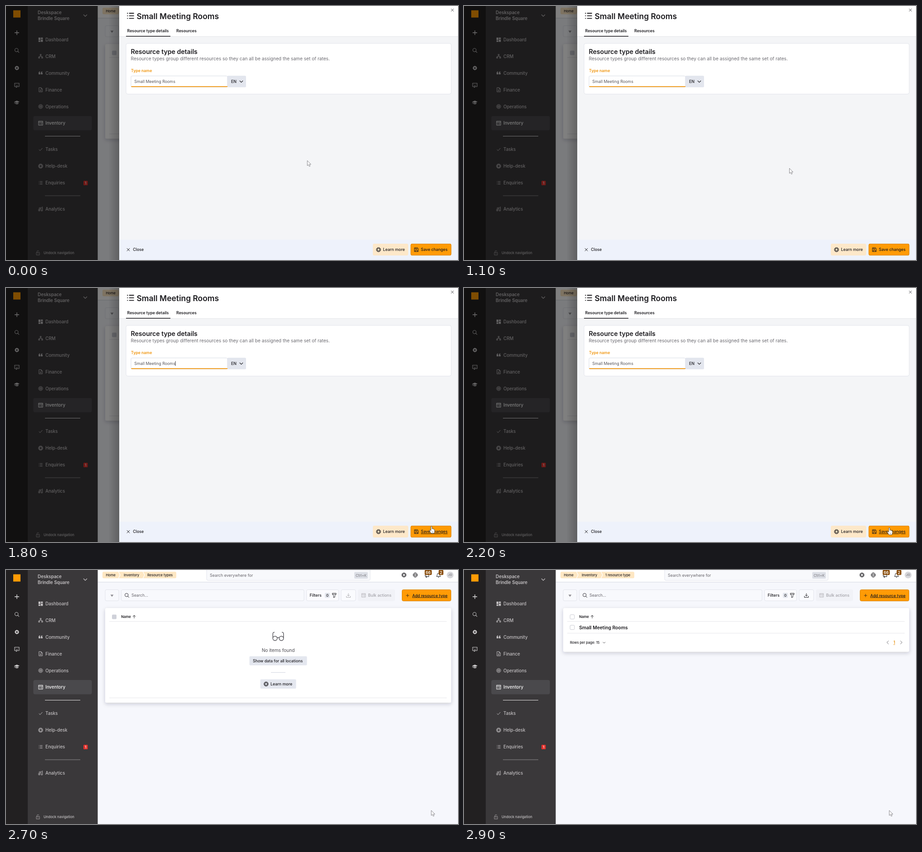
Recreate the animation shown at these times as an HTML page. Size 998 by 561 pixels, loop 3 s.

```html
<!DOCTYPE html>
<html lang="en">
<head>
<meta charset="utf-8">
<title>Add a resource type</title>
<style>
html, body { margin: 0; width: 100%; height: 100%; overflow: hidden; background: #f6f7fc; }
svg { display: block; width: 998px; height: 561px; font-family: Inter, sans-serif; font-optical-sizing: none; }
text { white-space: pre; }
</style>
</head>
<body>
<svg id="stage" viewBox="0 0 998 561" xmlns="http://www.w3.org/2000/svg"></svg>
<script>
const INK = '#1c1b1f', ORANGE = '#ff9b05', NAV = '#c4c1c3', RULE = '#e2e4eb', RIM = '#d98509';

// y is the middle of the capitals
const text = (x, y, s, size = 8.8, fill = INK, weight = 500, more = '') =>
  `<text x="${x}" y="${(y + size * .364).toFixed(2)}" font-size="${size}" font-weight="${weight}" fill="${fill}" ${more}>${s}</text>`;
const box = (x, y, w, h, fill, r = 0, stroke = 'none', more = '') =>
  `<rect x="${x}" y="${y}" width="${w}" height="${h}" rx="${r}" fill="${fill}" stroke="${stroke}" ${more}/>`;
const line = (x1, x2, y, stroke, w = 1, more = '') =>
  `<path d="M${x1} ${y}H${x2}" stroke="${stroke}" stroke-width="${w}" ${more}/>`;
const group = (id, ...parts) => `<g id="${id}">${parts.join('')}</g>`;
const UNDER = 'text-decoration="underline"';

// Outlines centred on the origin
const circle = (r, x = 0, y = 0) => `M${x - r} ${y}a${r} ${r} 0 1 0 ${2 * r} 0a${r} ${r} 0 1 0 ${-2 * r} 0z`;
const SHAPES = {
  plus: 'M-5 0H5M0-5V5',
  cross: 'M-3-3L3 3M3-3L-3 3',
  down: 'M-3.6-1.8L0 1.8L3.6-1.8',
  left: 'M2-3.8L-1.8 0L2 3.8',
  right: 'M-2-3.8L1.8 0L-2 3.8',
  up: 'M0 3.4V-3.2M-3-.3L0-3.3L3-.3',
  search: circle(3.7, -.8, -.8) + 'M1.9 1.9L5 5',
  ring: circle(4.7) + circle(2.7) + 'M-4.3-1.8L-2.3-1.3M-1.8-4.3L-1.3-2.3M4.3-1.8L2.3-1.3M1.8-4.3L1.3-2.3M-4.3 1.8L-2.3 1.3M-1.8 4.3L-1.3 2.3M4.3 1.8L2.3 1.3M1.8 4.3L1.3 2.3',
  globe: circle(4.7) + 'M-4.7 0H4.7M0-4.7C-2.8-2-2.8 2 0 4.7C2.8 2 2.8-2 0-4.7',
  gear: circle(3) + 'M0-5V-3M0 5V3M-5 0H-3M5 0H3M-3.5-3.5L-2-2M3.5-3.5L2-2M-3.5 3.5L-2 2M3.5 3.5L2 2',
  chat: 'M-5-4.5H5V3H1L-1.5 5V3H-5zM-2-1.8V-.8M2-1.8V-.8M-1.6 1Q0 1.8 1.6 1',
  people: 'M-1.2-4.5H1.2V-2.3H-1.2zM-4.6 1.8H-2.2V4H-4.6zM2.2 1.8H4.6V4H2.2zM0-2.3V0M-3.4 1.8V0H3.4V1.8',
  file: 'M-3.7-4.7H1L3.7-2V4.7H-3.7zM1-4.7V-2H3.7M-1.8.4H1.8M-1.8 2.5H1.8',
  chip: circle(4.5) + 'M-2-2H2V2H-2zM-1 0H1',
  table: 'M-4.6-4.5H4.6V4.5H-4.6zM-4.6-2.3H4.6M-2.8 0H-1.4M-2.8 2.3H-1.4M.2 0H3M.2 2.3H3',
  check: 'M-3.8.2L-1.2 2.7L3.9-2.8',
  list: 'M-4-3H-3M-4 0H-3M-4 3H-3M-1.7-3H4M-1.7 0H4M-1.7 3H4',
  chart: 'M-4.5 4.5V1H-2V4.5zM-2 4.5V-.5H1V4.5M1 4.5H4V-3M-4.2-1.2L-1-3L1-2.2L4.5-4.6',
  lock: 'M-3.5-.8H3.5V4.7H-3.5zM-2-.8V-3Q-2-4.8 0-4.8Q2-4.8 2-3M0 1V2.6',
  funnel: 'M-4.2-4.7H4.2V-2.6L1.4.6V4L-1.4 5V.6L-4.2-2.6zM-4.2-2.2H4.2',
  load: 'M0-4.5V1.5M-2.7-1L0 1.7L2.7-1M-4.5 1.6V4.4H4.5V1.6',
  disk: 'M-4.2-4.2H2.6L4.2-2.6V4.2H-4.2zM-2.2-4.2V-1.6H1.7V-4.2M-2.2 4.2V1H2.2V4.2',
  horn: 'M-4.5-1L3.5-4V3L-4.5 1.4zM-3 1.6V4.2H-.8V2',
  bell: 'M-4.4 2.8Q-3 1.5-3-1Q-3-4.4 0-4.4Q3-4.4 3-1Q3 1.5 4.4 2.8zM-1.2 4.6H1.2',
  glasses: circle(4.8, -7, 4) + circle(4.8, 7, 4) + 'M-2.3 3Q0 1.5 2.3 3M-11.8 4V-6Q-11.8-9.6-8-9.6M11.8 4V-6Q11.8-9.6 8-9.6'
};
const icon = (name, x, y, stroke = INK, w = 1, scale = 1) =>
  `<path d="${SHAPES[name]}" transform="translate(${x} ${y}) scale(${scale})" fill="none" stroke="${stroke}" stroke-width="${w}" stroke-linejoin="round"/>`;
const solid = (d, x, y, fill) => `<path d="${d}" transform="translate(${x} ${y})" fill="${fill}"/>`;

const navRow = (y, label, name, fill = NAV) =>
  text(87, y, label, 9.75, fill) + (name ? icon(name, 76.5, y, fill, .95) : '');

function sidebar() {
  const quote = 'M-4.5 3V-.5Q-4.3-3-1.3-3.4V-2Q-2.4-1.5-2.4-.4H-.7V3zM.5 3V-.5Q.7-3 3.7-3.4V-2Q2.6-1.5 2.6-.4H4.3V3z';
  const tiles = 'M-4.8-4.7H-.5V.8H-4.8zM.5-4.7H4.8V-1.5H.5zM-4.8 1.8H-.5V4.7H-4.8zM.5-.5H4.8V4.7H.5z';
  const cap = 'M-6-1.4L0-4L6-1.4L0 1.2zM-3.4.8V3Q0 5 3.4 3V.8L0 2.3zM-5.4-1H-4.6V3H-5.4z';
  return [
    box(0, 0, 48, 561, '#222021'), box(48, 0, 154.5, 561, '#3a383a'),
    box(16, 9.5, 16, 16, ORANGE),
    icon('plus', 24, 59, '#e4e2e3', 1.3), icon('search', 24, 98, '#bdbbbc', 1.1),
    icon('gear', 24, 137, '#d0cecf', 2.1, .95), icon('chat', 24, 175, '#c9c7c8', 1.1),
    solid(cap, 24, 213, '#c9c7c8'),
    text(70, 14.7, 'Deskspace', 9.9, NAV, 600), text(70, 27.2, 'Brindle Square', 9.9, NAV, 600),
    icon('down', 175, 21, NAV, 1.1, 1.1),
    box(60.3, 243, 129.3, 31.5, '#4a494c', 4),
    navRow(74.5, 'Dashboard'), solid(tiles, 76.5, 74.5, NAV),
    navRow(111.2, 'CRM', 'people'),
    navRow(148.2, 'Community'), solid(quote, 76.5, 148, NAV),
    navRow(185, 'Finance', 'file'), navRow(222, 'Operations', 'chip'),
    navRow(258.8, 'Inventory', 'table', '#fff'),
    line(86, 164, 287.5, '#e6e4e5', 1.2),
    navRow(316.8, 'Tasks', 'check'), navRow(353.6, 'Help-desk', 'ring'),
    navRow(390.6, 'Enquiries', 'list'),
    box(171, 386, 9.5, 10, '#e0322d', 1.5), text(175.7, 391, '1', 7, '#fff', 600, 'text-anchor="middle"'),
    line(86, 164, 419, '#8e8c8d'),
    navRow(448, 'Analytics', 'chart'),
    icon('lock', 70.5, 545.3, '#a5a2a4', .9), text(83, 545.3, 'Undock navigation', 7.6, NAV)
  ].join('');
}

function topBar() {
  const tag = '#fee7c3';
  const badge = (x, w, s) => box(x, 0, w, 11, '#884a06', 2) +
    text(x + w / 2, 5.7, s, 8.5, '#fff', 600, 'text-anchor="middle"');
  return [
    box(202.5, 0, 795.5, 26, '#fff'), line(202.5, 998, 26.5, '#dfe1e8'), line(202.5, 998, 27.5, '#eceef4'),
    box(213, 3.7, 163, 14.6, tag, 3),
    ...[248, 302].map(x => `<path d="M${x} 3L${x + 4} 11L${x} 19" fill="none" stroke="#fff" stroke-width="1.3"/>`),
    text(220.5, 11, 'Home', 7.55), text(260, 11, 'Inventory', 7.55),
    `<text id="crumb" x="312" y="13.75" font-size="7.55" font-weight="500" fill="${INK}"></text>`,
    box(443, -4, 361, 27, '#f8f9fc', 3, RULE), text(450, 11.3, 'Search everywhere for', 8.85, '#66646a', 400),
    box(769, 4.5, 30, 14.5, '#dcdfe6', 2), text(772, 11.8, 'Ctrl+K', 8, '#77767c', 400),
    icon('ring', 878.7, 11), icon('globe', 903.7, 11), icon('horn', 930, 12), icon('bell', 955, 11.5),
    badge(924.5, 15.5, '66'), badge(955.3, 10.4, '2'),
    `<circle cx="980.6" cy="11" r="7.6" fill="#d7d7db"/>`,
    text(980.6, 11, 'JO', 6.3, '#77767c', 500, 'text-anchor="middle"')
  ].join('');
}

function toolbar() {
  return [
    box(219, 43.5, 30, 24.5, '#f8f9fd', 3, RULE), solid('M-3.5-2H3.5L.8 1.2V2.2H-.8V1.2z', 234, 56.5, '#8b8a90'),
    box(254.5, 43.5, 403.5, 24.5, '#f8f9fd', 3, RULE), icon('search', 267, 56, '#333238', 1),
    text(277, 56, 'Search...', 8.8, '#66646a', 400),
    box(663.5, 43.5, 71, 24.5, '#fbfbfe', 3, RULE), text(670.5, 56, 'Filters', 8.9),
    box(704, 50.5, 11, 11, '#e2e5ec', 2), text(709.5, 56.2, '0', 8, INK, 500, 'text-anchor="middle"'),
    icon('funnel', 724.7, 56, INK, .9),
    box(740, 43.5, 32, 24.5, '#fafbfe', 3, RULE),
    `<g id="load">${icon('load', 756, 56)}</g>`,
    box(777, 43, 82, 25.5, '#f1f2f7', 3), icon('table', 789.5, 56, '#aaa9ae', .9, .9),
    text(799.5, 56, 'Bulk actions', 8.85, '#a3a2a8'),
    box(874.5, 43.5, 108, 25, ORANGE, 3, RIM), icon('plus', 886.7, 56.3, INK, 1.1, .7),
    text(897, 56.3, 'Add resource type', 8.8, INK, 500, UNDER)
  ].join('');
}

function listCard() {
  const rule = y => line(228, 973, y, '#e6e6eb');
  const tick = y => box(234.2, y - 4.8, 9.6, 9.6, '#fff', 2, '#c9cad2');
  return [
    `<rect id="card" x="219" y="84" width="764" rx="3.5" fill="#fff" filter="url(#soft)"/>`,
    text(254.3, 103.5, 'Name', 7.6, INK, 600), icon('up', 283, 103.3, INK, .9),
    rule(113.7),
    group('empty',
      box(234, 98.5, 10, 10, '#cfd1d9', 2),
      icon('glasses', 601, 147, '#55545a', 1.4),
      text(601, 177.5, 'No items found', 10.1, '#4c4b51', 400, 'text-anchor="middle"'),
      box(537.5, 190.5, 127, 20, '#e4e7ef', 2), text(545, 200.6, 'Show data for all locations', 8.75),
      line(585, 617, 226.3, '#cfd3de'),
      box(561.5, 241.5, 79, 20.5, '#e4e7ef', 2), icon('ring', 574.3, 251.8), text(584, 251.8, 'Learn more', 8.85),
      rule(282.5)),
    group('filled',
      tick(103.5), tick(126.8),
      text(254.3, 126.8, 'Small Meeting Rooms', 10.3, INK, 600), rule(139.5),
      text(234, 160, 'Rows per page: 15', 7.5), icon('down', 309.3, 160.3, INK, 1, .75),
      icon('left', 935.5, 160, '#6d6c72'), icon('right', 965.5, 160, '#6d6c72'),
      text(950, 160.2, '1', 8.6, '#e68a00', 600, 'text-anchor="middle" ' + UNDER))
  ].join('');
}

function panel() {
  return [
    box(0, 0, 998, 561, '#000', 0, 'none', 'opacity=".5"'),
    box(226, 0, 24, 561, 'url(#edge)'),
    box(250, 0, 748, 561, '#f4f5f7'),
    box(250, 0, 748, 67, '#fff'), line(250, 998, 67.3, '#e4e5ea'),
    box(250, 516, 748, 45, '#eef2fb'),
    icon('list', 275, 21.7, INK, .95, 1.9), text(288.5, 22.2, 'Small Meeting Rooms', 17.45, INK, 600),
    icon('cross', 985.6, 9, '#3c3b40', .9),
    text(267.5, 55, 'Resource type details', 8.8, INK, 600), text(376, 55, 'Resources', 8.8, INK, 600),
    line(265, 363, 66.7, INK, 1.6),
    box(265, 82.5, 718, 112, '#fff', 4, RULE),
    text(275.5, 100.4, 'Resource type details', 14.1, INK, 600),
    text(275.5, 116, 'Resource types group different resources so they can all be assigned the same set of rates.', 10.17, '#6b6a70', 400),
    group('label', text(276, 143.3, 'Type name', 8.7, 'inherit', 600)),
    `<rect id="field" x="276" y="154.5" width="213" height="24.5" rx="2.5" stroke="#d9dde6"/>`,
    text(283.3, 166.8, 'Small Meeting Rooms', 8.9, '#55545a', 400),
    box(488.5, 154, 41.5, 25.5, '#e3e6ee', 2.5), text(497, 166.8, 'EN'), icon('down', 519.5, 166.8, INK, 1.1),
    group('focus', line(276.5, 489, 178.2, '#f0930a', 1.8)),
    box(373.6, 161.5, .9, 10.5, INK, 0, 'none', 'id="caret"'),
    icon('cross', 270, 538.2, INK, .95, 1.05), text(280.3, 538.2, 'Close'),
    box(810, 525, 78, 26, '#fde8c9', 3), icon('ring', 822.5, 538.2),
    group('more', text(832.5, 538.2, 'Learn more', 8.85)),
    box(893.5, 525, 89.7, 26, ORANGE, 3),
    group('save', box(894, 525.5, 88.7, 25, 'none', 3, RIM),
      icon('disk', 906, 538.2), text(916, 538.2, 'Save changes')),
    group('busy',
      `<path id="spin" d="M0-4.6A4.6 4.6 0 1 1-4.6 0" fill="none" stroke="#d6a04a" stroke-width="1.1"/>`,
      text(916, 538.2, 'Save changes', 8.8, '#d3a35a'))
  ].join('');
}

function pointers() {
  const hand = 'M-1.3 1Q-1.3-.4 0-.4Q1.3-.4 1.3 1V5Q2.6 4.4 3.3 5.5Q4.6 5 5.2 6.3Q6.8 6 6.8 7.8V10.5Q6.8 12.5 5.6 15.2H-1Q-2.2 12.5-4.4 9.4Q-4.8 7.6-3 7.9L-1.3 9.4z';
  return group('arrow', `<path d="M0 0V11.2L2.5 8.9L4.3 12.9L6.3 12L4.5 8.2H8z" fill="#fff" stroke="#6c6b70" stroke-width=".8"/>`) +
    group('hand', `<path d="${hand}" fill="#fff" stroke="#333" stroke-width=".8"/><path d="M1.2 11V13.3M3 11V13.3" stroke="#555" stroke-width=".6"/>`) +
    group('stop', `<circle r="4.6" fill="#fff" stroke="#4a1010" stroke-width="2.4"/><path d="M-3-3L3 3" stroke="#c01822" stroke-width="1.8"/><circle r="4.6" fill="none" stroke="#d01f2a" stroke-width="1.6"/>`);
}

const stage = document.getElementById('stage');
stage.innerHTML = `<defs>
  <filter id="soft" x="-5%" y="-10%" width="110%" height="130%"><feDropShadow dx="0" dy="3" stdDeviation="4" flood-color="#1d2238" flood-opacity=".2"/></filter>
  <linearGradient id="edge"><stop stop-color="#000" stop-opacity="0"/><stop offset="1" stop-color="#000" stop-opacity=".22"/></linearGradient>
  </defs>` + box(0, 0, 998, 561, '#f6f7fc') + topBar() + toolbar() + listCard() + sidebar() +
  group('panel', panel()) + pointers();

const el = {};
stage.querySelectorAll('[id]').forEach(n => el[n.id] = n);
const show = (id, on) => el[id].style.display = on ? '' : 'none';

// time, x, y of the pointer's hot spot
const PATH = [
  [0, 665.3, 341.5], [600, 690.3, 350.5], [1100, 718.5, 358.5], [1200, 878.5, 520],
  [1300, 925, 527], [1400, 939.5, 526.7], [1900, 939.5, 526.7], [2300, 939, 531], [3000, 939, 531]
];
function pointerAt(t) {
  const i = PATH.findIndex(p => p[0] > t), a = PATH[i - 1], b = PATH[i];
  const k = (t - a[0]) / (b[0] - a[0]);
  return [a[1] + (b[1] - a[1]) * k, a[2] + (b[2] - a[2]) * k];
}

function draw(ms) {
  const t = Math.floor(ms % 3000 / 100) * 100;
  const saving = t >= 2500, closed = t >= 2700, loaded = t >= 2900;
  const hover = t >= 1300 && !saving;

  show('panel', !closed);
  show('caret', !saving && t % 1000 >= 500);
  show('focus', !saving);
  show('save', !saving);
  show('busy', saving);
  el.label.setAttribute('fill', saving ? INK : '#f0960f');
  el.field.setAttribute('fill', saving ? '#f5f8fd' : '#fff');
  el.save.setAttribute('text-decoration', hover ? 'underline' : 'none');
  el.more.setAttribute('text-decoration', saving ? 'underline' : 'none');
  el.spin.setAttribute('transform', `translate(906 538.2) rotate(${(t - 2500) * .36})`);

  show('empty', !loaded);
  show('filled', loaded);
  el.card.setAttribute('height', loaded ? 96.5 : 209);
  el.load.setAttribute('opacity', loaded ? 1 : .35);
  el.crumb.textContent = loaded ? '1 resource type' : 'Resource types';

  const kind = closed ? 'arrow' : saving ? 'stop' : hover ? 'hand' : 'arrow';
  for (const id of ['arrow', 'hand', 'stop']) show(id, id === kind);
  el[kind].setAttribute('transform', `translate(${pointerAt(t)})`);
}

const start = performance.now();
(function tick() {
  draw(performance.now() - start);
  requestAnimationFrame(tick);
})();
</script>
</body>
</html>
```
